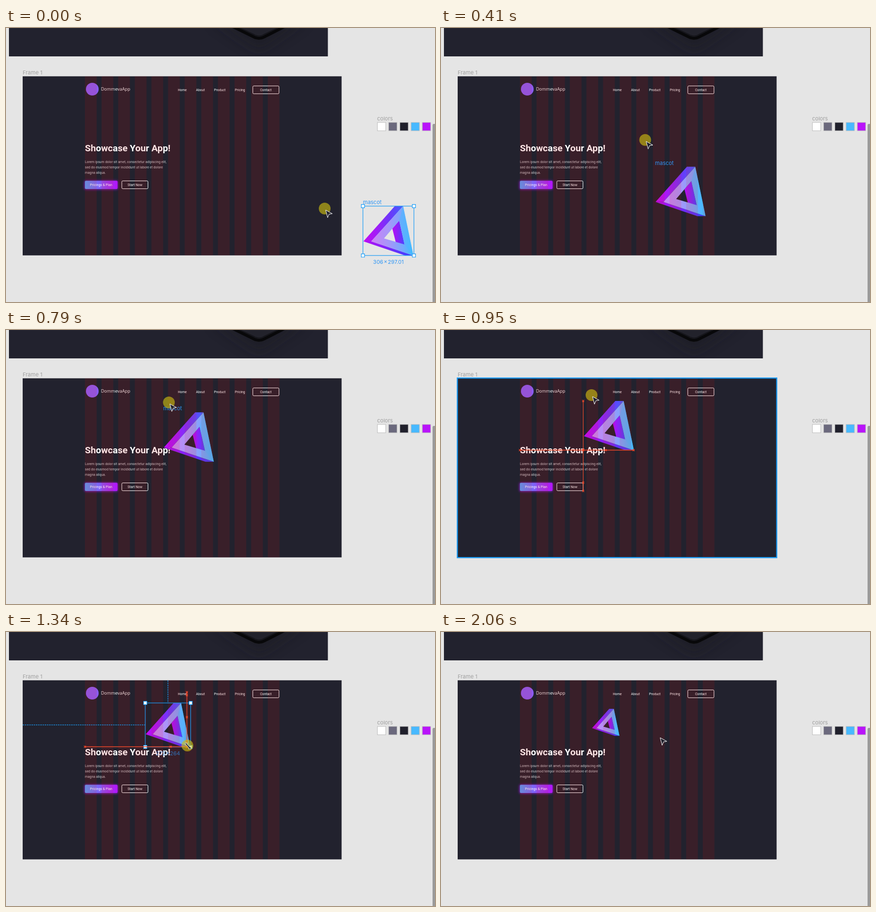
Recreate the animation shown at these times as an HTML page. Size 875 by 560 pixels, loop 2.23 s.

```html
<!DOCTYPE html>
<html lang="en">
<head>
<meta charset="utf-8">
<title>Placing a mascot</title>
<style>
html, body { margin: 0; width: 100%; height: 100%; overflow: hidden; background: #e5e5e5; }
svg { display: block; width: 875px; height: 560px; }
.ui { font: 11px Inter, sans-serif; fill: #a0a0a0; }
.ui.on { fill: #2f96f5; }
.page { font: 6.77px Roboto, sans-serif; fill: #fff; }
.mid { text-anchor: middle; }
.line { fill: none; stroke: #fff; }
.sel { stroke: #1b9cf5; stroke-width: 1.2; }
.snap { fill: none; stroke: #f0482a; stroke-width: 1.3; }
</style>
</head>
<body>
<svg viewBox="0 0 875 560">
  <defs>
    <pattern id="cols" x="161" y="0" width="33.9" height="560" patternUnits="userSpaceOnUse">
      <rect width="23.9" height="560" fill="#f00" fill-opacity=".1"/>
    </pattern>
    <linearGradient id="cta"><stop stop-color="#579df5"/><stop offset="1" stop-color="#b512f8"/></linearGradient>
    <linearGradient id="back" gradientUnits="userSpaceOnUse" x1="1" x2="84">
      <stop stop-color="#c20af2"/><stop offset=".3" stop-color="#a51af7"/>
      <stop offset=".65" stop-color="#6b38fa"/><stop offset="1" stop-color="#4064ff"/>
    </linearGradient>
    <linearGradient id="base" gradientUnits="userSpaceOnUse" x1="1" x2="95">
      <stop stop-color="#b80cf5"/><stop offset="1" stop-color="#4040ff"/>
    </linearGradient>
    <linearGradient id="core" gradientUnits="userSpaceOnUse" x1="60" x2="85">
      <stop stop-color="#b80cf5"/><stop offset=".5" stop-color="#8426f8"/><stop offset="1" stop-color="#4448ff"/>
    </linearGradient>
    <linearGradient id="front" gradientUnits="userSpaceOnUse" x1="17" x2="98">
      <stop stop-color="#cc84f4"/><stop offset=".45" stop-color="#a596fa"/>
      <stop offset=".75" stop-color="#7ba6fc"/><stop offset="1" stop-color="#48b9ff"/>
    </linearGradient>
    <filter id="soft" x="-30%" y="-80%" width="160%" height="260%"><feGaussianBlur stdDeviation="2.6"/></filter>
    <filter id="haze" x="-50%" y="-100%" width="200%" height="300%"><feGaussianBlur stdDeviation="14"/></filter>
    <clipPath id="upper"><rect x="6" width="650.5" height="58"/></clipPath>
  </defs>

  <rect width="875" height="560" fill="#e5e5e5"/>
  <g clip-path="url(#upper)">
    <rect x="6" width="651" height="58" fill="#22222e"/>
    <path d="M420-20H612L516 46Z" fill="#1a1a22" opacity=".55" filter="url(#haze)"/>
    <path d="M448-10L505 18Q516 24 527 18L582-10" fill="#22222b" stroke="#08080a" stroke-width="6"/>
    <path d="M456-10L507 14Q516 19 525 14L574-10" fill="#22222b" stroke="#141419" stroke-width="2"/>
  </g>

  <text class="ui" x="34" y="95">Frame 1</text>
  <text class="ui" x="757" y="189">colors</text>
  <g id="swatches" stroke="#bdbdbd"></g>
  <path d="M870 560V199Q870 196 872.500 196H875V560Z" fill="#9b9b9b"/>

  <rect x="34" y="98.700" width="650.500" height="366" fill="#22222e"/>
  <circle cx="176" cy="125" r="13" fill="#8a5cf0"/>
  <text x="193.700" y="128" font-family="Open Sans, sans-serif" font-size="9" fill="#f4f4f4">DommevaApp</text>
  <g class="page">
    <text x="350.500" y="129">Home</text>
    <text x="387.500" y="129">About</text>
    <text x="424.300" y="129">Product</text>
    <text x="466.700" y="129">Pricing</text>
    <text x="161" y="252" font-size="18.950" font-weight="700">Showcase Your App!</text>
    <g fill="#c9c9cc">
      <text x="161" y="276">Lorem ipsum dolor sit amet, consectetur adipiscing elit,</text>
      <text x="161" y="287">sed do eiusmod tempor incididunt ut labore et dolore</text>
      <text x="161" y="298">magna aliqua.</text>
    </g>
    <rect x="160" y="312" width="68" height="18" rx="3" fill="#a51af0" opacity=".75" filter="url(#soft)"/>
    <rect x="161" y="312.300" width="66.500" height="16.700" rx="2" fill="url(#cta)"/>
    <rect class="line" x="503.400" y="118.400" width="53.400" height="16" rx="2"/>
    <rect class="line" x="236.200" y="312.500" width="53.400" height="16" rx="2"/>
    <g class="mid">
      <text x="530" y="129">Contact</text>
      <text x="194" y="323">Pricings &amp; Plan</text>
      <text x="263" y="323">Start Now</text>
    </g>
  </g>

  <g id="mascot">
    <path d="M1 72L65 0H82L17 72Z" fill="url(#back)"/>
    <path d="M1 72H17L103 101H86Z" fill="url(#base)"/>
    <path d="M60 46L74 29.500L85 79L67 74Z" fill="url(#core)"/>
    <path d="M17 72L82 0L103 101ZM43 66L85 78.500L74 29.500Z" fill="url(#front)" fill-rule="evenodd"/>
    <path d="M82 0L103 101L85 78.500L74 29.500Z" fill="#48b9ff" opacity=".45"/>
  </g>
  <rect x="161" y="98.700" width="396.800" height="366" fill="url(#cols)"/>

  <rect id="drop" x="33.300" y="98.200" width="651.500" height="367" fill="none" stroke="#1b9cf5" stroke-width="2.300"/>
  <path id="rulers" class="sel" fill="none" stroke-dasharray="3 1.500"/>
  <g id="select">
    <rect id="box" class="sel" fill="none"/>
    <path id="grips" class="sel" fill="#fff"/>
  </g>
  <path id="guides" class="snap"/>
  <text id="name" class="ui on">mascot</text>
  <text id="size" class="ui on mid"></text>
  <g id="cursor">
    <circle id="press" r="12" fill="#d0c010" fill-opacity=".62"/>
    <path id="arrow" d="M2 3L15.500 10.500L9 11.500L6 18.500Z" fill="#22222e" stroke="#fff"/>
    <path id="resize" d="M-4 -1V-5H0L-1.500 -3.500L5.500 3.500L7 2V7H2L3.500 5.500L-3 -2Z" fill="#22222e" stroke="#fff" stroke-width=".8"/>
  </g>
</svg>
<script>
const $ = id => document.getElementById(id);
const set = (id, attrs) => { for (const k in attrs) $(id).setAttribute(k, attrs[k]); };
const show = (id, on) => { $(id).style.display = on ? '' : 'none'; };

const LOOP = 2230;
const ticks = [0, 80, 160, 240, 320, 390, 460, 540, 620, 710, 790, 870, 950, 1050, 1110,
  1180, 1260, 1340, 1420, 1500, 1580, 1660, 1730, 1810, 1900, 1980, 2060];

// time, mascot x, y, width, pointer x, y
const keys = [
  [0, 728, 364, 104, 650, 369],
  [240, 515, 364, 104, 471, 284],
  [460, 400, 246, 104, 391, 203],
  [620, 353, 193, 104, 359, 164],
  [950, 290.5, 145, 104, 307, 133],
  [1110, 284, 145, 104, 301, 133],
  [1180, 284, 145, 104, 386, 246],
  [1340, 284, 145, 92.6, 370, 232],
  [1660, 284, 145, 66.4, 341, 207],
  [1730, 284, 145, 57, 337, 201],
  [1810, 284, 145, 57, 318, 185],
  [1980, 307.5, 157, 57, 341.5, 197],
  [2060, 307.5, 157, 57, 445, 213]
];

// Alignment lines with a small cross at every aligned point
const cross = (x, y) => `M${x - 2} ${y - 2}l4 4m0 -4l-4 4`;
const across = (y, ...xs) => `M${xs[0]} ${y}H${xs.at(-1)}` + xs.map(x => cross(x, y)).join('');
const down = (x, ...ys) => `M${x} ${ys[0]}V${ys.at(-1)}` + ys.map(y => cross(x, y)).join('');
const guides = {
  240: across(464.5, 34, 515, 619, 684),
  620: across(193, 353, 457, 757, 867),
  950: across(245.5, 161, 290, 336, 393) + down(290, 145, 245, 312, 329),
  1340: across(234.5, 161, 336, 369) + down(369, 123, 129, 174, 224, 235),
  1660: cross(341, 173) + cross(341, 223)
};

['#fff', '#6b697d', '#20202c', '#48b9ff', '#b914fa'].forEach((fill, i) => {
  $('swatches').innerHTML += `<rect x="${757.5 + 22.9 * i}" y="193" width="17" height="17" fill="${fill}"/>`;
});

function poseAt(t) {
  const i = Math.max(1, keys.findIndex(k => k[0] >= t));
  const a = keys[i - 1], b = keys[i], f = (t - a[0]) / (b[0] - a[0]);
  return a.map((v, j) => v + (b[j] - v) * f);
}

function draw(now) {
  const time = now % LOOP;
  const t = ticks.filter(v => v <= time).at(-1);
  const [, x, y, w, px, py] = poseAt(t);
  const h = w * 297.01 / 306, r = x + w, b = y + h, cx = x + w / 2, cy = y + h / 2;
  const resizing = t >= 1180 && t <= 1730;
  const selected = t === 0 || t >= 1180 && t <= 1810;

  set('mascot', { transform: `translate(${x} ${y}) scale(${w / 104})` });
  set('box', { x, y, width: w, height: h });
  set('grips', { d: [[x, y], [r, y], [x, b], [r, b]]
    .map(([u, v]) => `M${u - 3.3} ${v - 3.3}h6.600v6.600h-6.600z`).join('') });
  show('select', selected);

  set('rulers', { d: `M34 ${cy}H${x}M${cx} 99V${y}` });
  show('rulers', resizing && t > 1180);
  set('guides', { d: guides[t] || '', opacity: t === 1660 ? .4 : 1 });
  show('drop', t >= 870 && t <= 1110);

  set('name', { x, y: y - 4 });
  show('name', t < 870);
  const units = w / 104 * 306;
  $('size').textContent = t ? `${Math.round(units)}\u200a×\u200a${Math.round(units * 297.01 / 306)}` : '306\u200a×\u200a297.01';
  set('size', { x: cx, y: b + 17, opacity: t === 1340 ? .7 : 1 });
  show('size', selected);

  set('cursor', { transform: `translate(${px} ${py})` });
  show('press', t < 2060);
  show('arrow', !resizing);
  show('resize', resizing);
  requestAnimationFrame(draw);
}
draw(0);
</script>
</body>
</html>
```
